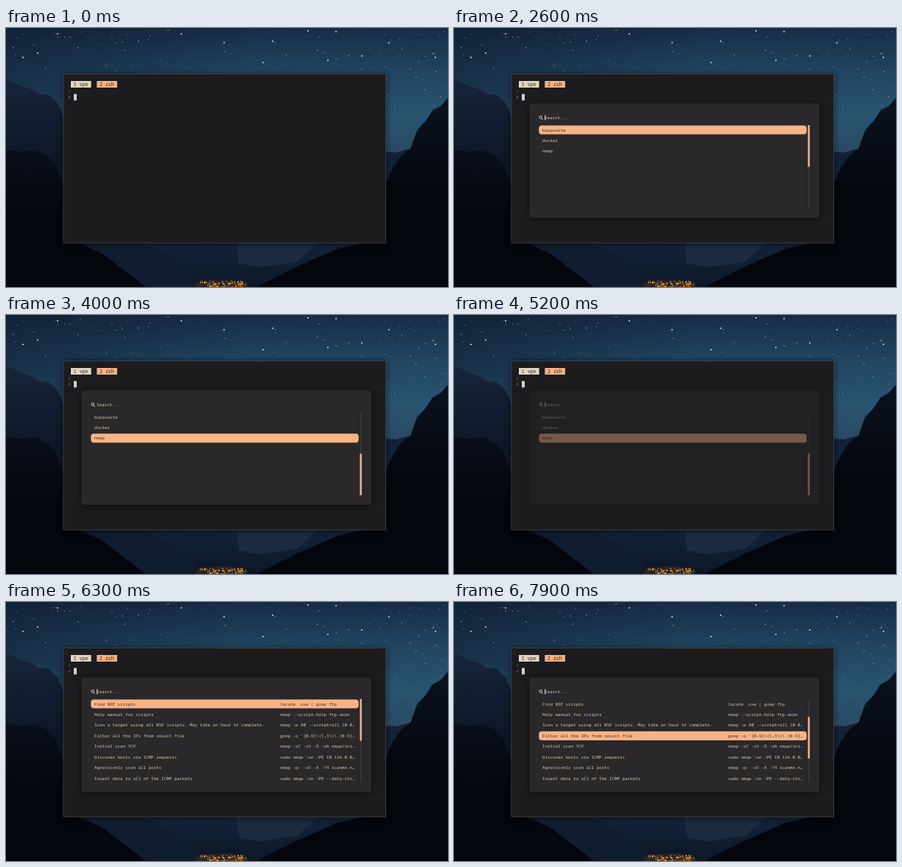
An HTML page with a canvas for the animation above (8000 ms loop, 600x352 px).

```html
<!DOCTYPE html>
<html lang="en">
<head>
<meta charset="utf-8">
<title>Command launcher</title>
<style>
  html, body { margin: 0; width: 100%; height: 100%; overflow: hidden; background: #05080f; }
  canvas, svg { position: absolute; left: 0; top: 0; width: 600px; height: 352px; }
  text { font: 5.83px "Noto Sans Mono", "DejaVu Sans Mono", monospace; white-space: pre; fill: #d9cfaa; }
  .tab { font-size: 6.6px; fill: #29272a; }
  .shadow { filter: drop-shadow(0 1px 4px #0009); }
</style>
</head>
<body>
<canvas width="600" height="352"></canvas>
<svg viewBox="0 0 600 352">
  <rect class="shadow" x="78" y="62.5" width="437.5" height="229.5" fill="#1c1b1d" stroke="#49494b" stroke-width=".8"/>
  <rect x="88" y="72" width="27.6" height="9" fill="#dfd6c0"/>
  <rect x="123.3" y="72" width="27.6" height="9" fill="#f5b284"/>
  <text class="tab" x="91.8" y="79">1 vpn</text>
  <text class="tab" x="127" y="79">2 zsh</text>
  <text x="84" y="88" style="font-style:italic;fill:#9c958a">/</text>
  <text x="84" y="96" style="font-size:6.6px;fill:#827b70">»</text>
  <rect x="92" y="89.7" width="4" height="8.7" fill="#d8d2c8"/>
  <g id="menu">
    <rect class="shadow" x="102.5" y="102.5" width="393.5" height="155.5" rx="4" fill="#2a282a"/>
    <g fill="none" stroke="#e4dab8" stroke-width="1">
      <circle cx="117.6" cy="121.4" r="1.8"/>
      <path d="M118.9 122.8L120.8 124.7"/>
    </g>
    <text x="123" y="124">Search...</text>
    <rect id="caret" x="123.2" y="118.4" width=".9" height="7" fill="#efe6cc"/>
    <rect id="bar" x="115.2" width="363.5" height="12.2" rx="4" fill="#f8b486"/>
    <g id="rows"></g>
    <rect x="481.2" y="132" width="1" height="113" fill="#454144"/>
    <rect id="thumb" x="480.4" width="2.5" height="56.5" fill="#f8b486"/>
  </g>
</svg>
<script>
const LOOP = 8000, ROW = 14.43;
const $ = id => document.getElementById(id);

const tools = [["burpsuite"], ["docker"], ["nmap"]];
const commands = [
  ["Find NSE scripts", "locate .nse | grep ftp"],
  ["Help manual for scripts", "nmap --script-help ftp-anon"],
  ["Scan a target using all NSE scripts. May take an hour to complete.", "nmap -p 80 --script=all 10.0…"],
  ["Filter all the IPs from result file", "grep -o '[0-9]\\{1,3\\}\\.[0-9]…"],
  ["Initial scan TCP", "nmap -sC -sV -O -oA nmap/ini…"],
  ["Discover hosts via ICMP requests", "sudo nmap -sn -PE 10.124.0.0…"],
  ["Agressively scan all ports", "nmap -p- -sV -A -T4 scanme.n…"],
  ["Insert data to all of the ICMP packets", "sudo nmap -sn -PE --data-str…"]
];

// Each menu opens, moves its selection at the given times, then closes.
const menus = [
  { items: tools, open: 2170, close: 5100, moves: [3200, 3600] },
  { items: commands, open: 5850, close: 9000, moves: [6900, 7250, 7600] }
];

const clamp = v => Math.max(0, Math.min(1, v));

function addText(parent, x, y, content) {
  const el = document.createElementNS("http://www.w3.org/2000/svg", "text");
  el.setAttribute("x", x);
  el.setAttribute("y", y);
  el.textContent = content;
  parent.append(el);
}

let shown = null;
function fillRows(items) {
  if (shown === items) return;
  shown = items;
  $("rows").replaceChildren();
  items.forEach((cells, i) => cells.forEach((cell, col) =>
    addText($("rows"), col ? 372 : 120, 140.6 + i * ROW, cell)));
}

function draw(t) {
  const m = menus.find(m => t >= m.open && t < m.close + 170);
  $("menu").style.opacity = m ? clamp((t - m.open) / 170) * clamp(1 - (t - m.close) / 170) : 0;
  if (!m) return;
  fillRows(m.items);
  const sel = m.moves.filter(at => t >= at).length;
  $("bar").setAttribute("y", 132.4 + sel * ROW);
  $("thumb").setAttribute("y", 132 + 56.5 * sel / (m.items.length - 1));
  $("caret").style.opacity = (t - m.open) % 1000 < 500 ? 1 : 0;
  [...$("rows").children].forEach(el => {
    const active = Math.round((el.getAttribute("y") - 140.6) / ROW) === sel;
    el.style.fill = active ? "#332b29" : "#d9cfaa";
  });
}

function paintLandscape() {
  const c = document.querySelector("canvas").getContext("2d");
  let seed = 17;
  const rnd = () => (seed = seed * 16807 % 2147483647) / 2147483647;

  const gradient = (x0, y0, x1, y1, ...stops) => {
    const g = c.createLinearGradient(x0, y0, x1, y1);
    stops.forEach((s, i) => g.addColorStop(i / (stops.length - 1), s));
    return g;
  };
  const shape = (fill, path) => { c.fillStyle = fill; c.fill(new Path2D(path)); };
  const dot = (x, y, size, color) => { c.fillStyle = color; c.fillRect(x, y, size, size); };

  // Sky, darker towards the upper left
  c.fillStyle = gradient(0, 0, 0, 180, "#172c45", "#214562", "#29546f", "#29485f");
  c.fillRect(0, 0, 600, 352);
  c.fillStyle = gradient(0, 0, 330, 60, "#0d192a88", "#0d192a00");
  c.fillRect(0, 0, 600, 180);

  for (let i = 0; i < 900; i++) {
    const x = rnd() * 600, y = rnd() * 165, a = rnd() ** 4;
    dot(x, y, .6 + a * .7, `rgba(215,228,235,${(.12 + a * .75) * (1 - y / 260)})`);
  }
  [[238, 8], [23, 40], [43, 34], [448, 5], [296, 20], [483, 38], [437, 44],
   [410, 4], [362, 18], [349, 47], [70, 8], [583, 40], [520, 20]].forEach(([x, y]) => {
    c.fillStyle = "#e6edf0";
    c.beginPath();
    c.arc(x, y, .95, 0, 7);
    c.fill();
  });

  // Valley floor haze and the far cliffs
  c.fillStyle = gradient(0, 285, 0, 352, "#14253c", "#0c1727");
  c.fillRect(70, 280, 460, 72);
  shape("#1b2b40", "M313 285L345 285L425 290L395 318L345 325L316 320Z");
  shape("#101c2f", "M70 285L175 285L245 325L270 352L70 352Z");

  // Left and right slopes
  shape(gradient(0, 70, 0, 180, "#16243a", "#0d1727"),
    "M0 70L12 74L22 80L34 83L44 90L58 91L70 102L78 122L90 300L0 300Z");
  shape("#142238", "M510 168L530 169L552 163L560 300L510 300Z");
  shape(gradient(0, 165, 0, 260, "#090f1b", "#03060c"),
    "M0 165L18 168L40 166L56 174L67 186L78 215L82 285L130 306L190 352L0 352Z");
  shape(gradient(0, 95, 0, 230, "#0a1320", "#03060c"),
    "M600 95L590 106L579 112L570 126L558 139L549 164L536 174L525 190L514 215L514 285L450 300L400 322L340 352L600 352Z");

  // Village lights
  c.fillStyle = "#6b3a1755";
  c.beginPath();
  c.ellipse(293, 350, 36, 8, 0, 0, 7);
  c.fill();
  const lights = ["#e88422", "#ffb13c", "#a95518", "#ffd98a"];
  for (let i = 0; i < 115; i++) {
    const x = 258 + rnd() * 68, y = 343 + rnd() * 9;
    if (x > 272 || y < 347) dot(x, y, .8 + rnd() * .9, lights[Math.floor(rnd() * 4)]);
  }
}

function frame(now) {
  draw(now % LOOP);
  requestAnimationFrame(frame);
}

paintLandscape();
draw(0);
requestAnimationFrame(frame);
</script>
</body>
</html>
```
